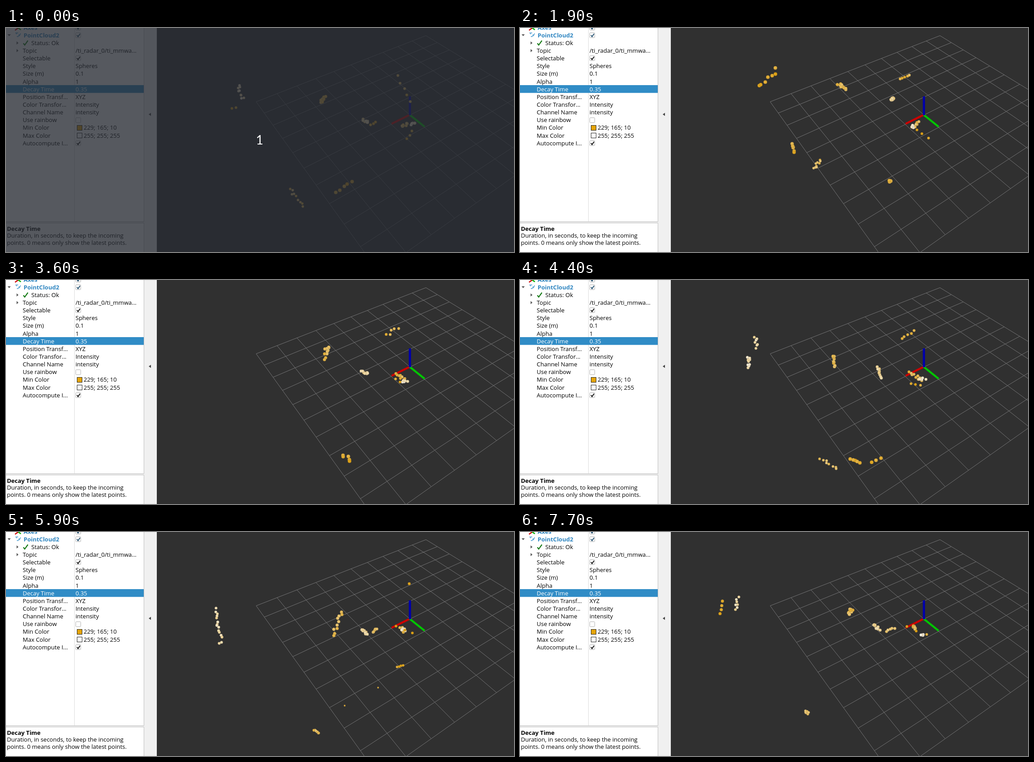
Write an HTML page with a canvas that moves like this. It is 1125 by 498 pixels and loops after 7900 ms.

```html
<!DOCTYPE html>
<html lang="en">
<head>
<meta charset="utf-8">
<title>Radar point cloud</title>
<style>
  html, body { margin: 0; width: 100%; height: 100%; overflow: hidden; background: #303030; }
  svg, canvas { position: absolute; left: 0; top: 0; width: 1125px; height: 498px; display: block; }
  text { font: 13px "Open Sans", "Noto Sans", sans-serif; fill: #000; white-space: pre; }
  .bold { font-weight: 700; }
  .blue { fill: #2f86c1; }
  .lit { fill: #fff; }
  .count { font: 28px Lato, sans-serif; fill: #fff; text-anchor: middle; }
</style>
</head>
<body>
<svg id="scene" viewBox="0 0 1125 498"></svg>
<canvas id="cloud" width="1125" height="498"></canvas>
<svg id="veil" viewBox="0 0 1125 498">
  <rect width="1125" height="498" fill="rgb(39,43,50)" fill-opacity=".78"/>
  <text class="count" x="561.5" y="259">1</text>
</svg>
<script>
const LOOP = 7900, STEP = 100, LIFE = 4; // a return stays for LIFE steps
const scene = document.getElementById('scene');
const veil = document.getElementById('veil');
const ctx = document.getElementById('cloud').getContext('2d');

// ---------- static scene ----------
function add(tag, attrs, label) {
  const el = document.createElementNS('http://www.w3.org/2000/svg', tag);
  for (const k in attrs) el.setAttribute(k, attrs[k]);
  if (label) el.textContent = label;
  scene.append(el);
}
const rect = (x, y, width, height, fill, more) => add('rect', { x, y, width, height, fill, ...more });
const path = (d, stroke, width = 1, fill = 'none') => add('path', { d, stroke, 'stroke-width': width, fill });
const text = (x, y, label, cls = '') => add('text', { x, y, class: cls }, label);
const rowY = i => 16 + 17.15 * i;

// perspective of the ground plane, one unit per cell
function ground(u, v) {
  const w = 1 + .0265 * u - .036 * v;
  return [(554 + 62.25 * u - 2.6 * v) / w, (164 - 14.25 * u + 18.3 * v) / w].map(n => n.toFixed(1));
}

function drawView() {
  rect(334, 0, 791, 498, '#303030');
  let d = '';
  for (let i = 0; i <= 10; i++) {
    d += `M${ground(i, 0)}L${ground(i, 10)}M${ground(0, i)}L${ground(10, i)}`;
  }
  path(d, '#757576');
  path('M894 193L854 213', '#cc0000', 4.4);
  path('M894 193L927 219.5', '#00c400', 4.4);
  path('M894.5 194V152', '#0000a8', 5);
}

function checkbox(y, on, color = '#111') {
  rect(154.5, y - 5.5, 11, 11, '#fff', { stroke: '#b0b0b0', rx: 1 });
  if (on) path(`M157 ${y}l2.5 3.2l4.5 -6.5`, color, 2);
}

function drawPanel() {
  rect(0, 0, 334, 498, '#f0f0f0');
  rect(0, 0, 305, 430, '#fff');
  rect(0, 434, 305, 64, '#fff');
  path('M0 430.5H305.5V0M0 433.5H305.5V498', '#bdbdbd');
  path('M151.5 0V430', '#dcdcdc');
  path('M321 188.5v7l-5 -3.5z', 'none', 0, '#444');
  rect(0, 127, 305, 17.3, '#308cc6');

  text(39, 3.6, 'Axes', 'bold blue');
  path('M27 0L20 5', '#cc0000', 2.5);
  path('M27 0L33 4', '#00b000', 2.5);
  checkbox(-1, true, '#24506f');

  path('M3.5 14h7l-3.5 4z', 'none', 0, '#555');
  for (let i = 0; i < 11; i++) {
    add('circle', { cx: 22 + i * 7 % 11, cy: 11 + i * 4 % 10, r: 1, fill: '#3f96cf' });
  }
  text(39, 20.5, 'PointCloud2', 'bold blue');
  checkbox(16, true, '#24506f');
  for (const i of [1, 2]) path(`M23.5 ${rowY(i) - 3.5}v7l4 -3.5z`, 'none', 0, '#555');
  path('M38.5 34l3 4l7 -10', '#147a14', 2.2);
  text(56, rowY(1) + 4.6, 'Status: Ok');

  const rows = [
    ['Topic', '/ti_radar_0/ti_mmwa...'], ['Selectable', true], ['Style', 'Spheres'],
    ['Size (m)', '0.1'], ['Alpha', '1'], ['Decay Time', '0.35'],
    ['Position Transf...', 'XYZ'], ['Color Transfor...', 'Intensity'],
    ['Channel Name', 'intensity'], ['Use rainbow', false],
    ['Min Color', '229; 165; 10', '#e5a50a'], ['Max Color', '255; 255; 255', '#fff'],
    ['Autocompute I...', true]
  ];
  rows.forEach(([name, value, swatch], n) => {
    const y = rowY(n + 2), cls = name === 'Decay Time' ? 'lit' : '';
    text(37, y + 4.6, name, cls);
    if (typeof value === 'boolean') return checkbox(Math.round(y), value);
    if (swatch) rect(157.5, Math.round(y) - 5.5, 11, 11, swatch, { stroke: '#222' });
    text(swatch ? 172 : 154, y + 4.6, value, cls);
  });

  text(2, 451, 'Decay Time', 'bold');
  text(2, 466, 'Duration, in seconds, to keep the incoming');
  text(2, 481.5, 'points. 0 means only show the latest points.');
}

// ---------- radar returns ----------
let seed = 11;
function rnd() {
  seed = (seed + 0x6D2B79F5) | 0;
  let t = Math.imul(seed ^ seed >>> 15, 1 | seed);
  t = t + Math.imul(t ^ t >>> 7, 61 | t) ^ t;
  return ((t ^ t >>> 14) >>> 0) / 4294967296;
}
const spread = n => (rnd() - .5) * 2 * n;
const mix = (a, b, u) => a + (b - a) * u;
const clamp = u => Math.min(1, Math.max(0, u));

// eased place of a streak; it settles shortly before each key so its trail has gathered there
function streakAt(keys, s) {
  const i = keys.findIndex(k => k[0] > s);
  if (i === 0) return keys[0];
  if (i < 0) return keys[keys.length - 1];
  const a = keys[i - 1], b = keys[i];
  const u = clamp((s - a[0]) / (b[0] - a[0] - .3));
  const e = u * u * (3 - 2 * u);
  return a.map((v, k) => mix(v, b[k], e));
}

// a reflecting object: `count` returns along a drifting streak, a quarter renewed each step
// key: seconds, centre x, y, half extent x, y
const dots = [];
function track(count, r, w, jitter, ...keys) {
  const first = Math.round(keys[0][0] * 10) - 5;
  const last = Math.round(keys[keys.length - 1][0] * 10) + 3;
  for (let step = first; step <= last; step++) {
    const [, x, y, dx, dy] = streakAt(keys, step / 10);
    for (let j = 0; j < count; j++) {
      if ((step - first) % LIFE !== j % LIFE) continue;
      const along = count > 1 ? 2 * j / (count - 1) - 1 : 0;
      dots.push({
        x: x + dx * along + spread(jitter),
        y: y + dy * along + spread(jitter),
        r, w: clamp(w + spread(.15)), born: step
      });
    }
  }
}

function buildTracks() {
  // far left
  track(9, 2.9, .75, 4, [0, 519, 143, 4, 14], [.9, 521, 129, 3, 10]);
  track(7, 4, .05, 4, [1.9, 549, 112, -20, 20], [2.8, 526, 84, -20, 22]);
  track(7, 3, .7, 3, [4.4, 523, 139, 2, 11], [5.9, 467, 187, 2, 16], [7.7, 480, 160, -2, 15]);
  track(9, 3.1, .75, 4, [4.4, 507, 182, 0, 13], [5.9, 473, 225, 3, 22]);
  track(4, 3.5, .05, 1, [7.7, 446, 168, -2, 14]);
  track(2, 3, .1, 1, [0, 505, 178, 5, 0]);
  track(4, 2.5, .1, 3, [2.8, 597, 116, 0, 13]);
  track(6, 3.8, .15, 2, [1.9, 605, 266, 1, 9], [2.8, 584, 237, 2, 11]);

  // middle of the plane
  track(10, 3.5, .3, 3, [0, 701, 161, 4, -7], [.9, 699, 160, 5, -5], [1.9, 713, 130, 8, 7],
    [2.8, 726, 137, 3, -6], [4.4, 696, 180, -1, -13], [5.9, 734, 203, 10, -26], [7.7, 731, 177, 4, -7]);
  track(9, 3.3, .6, 2.5, [0, 797, 208, 6, 3], [.9, 796, 207, 5, 5], [1.9, 825, 158, 2, -3],
    [2.8, 793, 207, 8, -6], [4.4, 795, 205, 3, 11], [5.9, 794, 223, 5, 6], [7.7, 790, 212, 6, 5]);
  track(3, 3.1, .1, 2, [0, 813, 212, 4, -3], [.9, 800, 215, 4, -4]);
  track(5, 3.2, .4, 1.5, [5.9, 817, 219, 3, -4], [7.7, 820, 217, 9, -3]);
  track(7, 3.6, .3, 4, [2.8, 793, 147, -3, 7]);
  track(6, 3.9, .4, 4, [2.8, 715, 305, -10, 10]);
  track(6, 2.7, .4, 1.5, [2.8, 857, 300, 10, -3]);
  track(4, 2.8, .1, 1, [5.9, 873, 298, 6, -2]);
  track(2, 1.9, .05, 0, [5.9, 787, 366, -37, 20]);

  // around the sensor
  track(5, 3.1, .25, 2, [0, 881, 135, 14, 28], [.9, 856, 114, 9, -8], [1.9, 853, 110, 11, -5],
    [2.8, 852, 107, 11, -5], [4.4, 859, 121, 14, -8]);
  track(1, 3.2, .05, 0, [5.9, 893, 115, 0, 0]);
  track(9, 3.2, .3, 3, [0, 884, 215, 7, -2], [.9, 877, 218, 7, 1], [1.9, 875, 216, 8, -6],
    [2.8, 872, 215, 8, 5], [4.4, 876, 214, 12, 8], [5.9, 879, 217, 4, 4], [7.7, 873, 213, 2, 3]);
  track(5, 3.2, .85, 2, [0, 902, 213, 4, -1], [.9, 900, 214, 2, 2], [1.9, 870, 219, 1, -2],
    [2.8, 875, 232, 2, 6], [4.4, 890, 219, 7, 0], [5.9, 880, 217, 3, 1], [7.7, 890, 228, 2, 1]);
  track(3, 3, .1, 2, [0, 893, 238, 7, -8], [.9, 895, 230, 1, 1], [1.9, 891, 234, 12, 9],
    [2.8, 863, 210, 4, 3], [4.4, 876, 233, 12, 1], [5.9, 882, 217, 17, 6], [7.7, 879, 220, 21, 9]);

  // near edge
  track(9, 2.8, .35, 3, [0, 644, 376, 16, 18], [.9, 651, 386, 8, 6], [1.9, 658, 303, -5, 10]);
  track(8, 2.9, .35, 3, [4.4, 684, 409, 18, 11], [5.9, 686, 444, 6, 5], [7.7, 635, 401, 2, 2]);
  track(5, 4, .1, 2, [0, 748, 354, 18, -11], [.9, 751, 360, 9, -8], [1.9, 819, 340, 0, 0],
    [2.8, 768, 389, 5, 10], [4.4, 742, 402, 12, 5]);
  track(3, 4, .1, 1, [4.4, 789, 401, 10, -5]);
  track(5, 4.5, .15, 2, [2.8, 610, 475, -10, 15]);
}

function shade(w, k) {
  const [r, g, b] = [[226, 255], [165, 250], [24, 240]].map(([lo, hi]) => Math.round(mix(lo, hi, w) * k));
  return `rgb(${r},${g},${b})`;
}
function disc(x, y, r, fill) {
  ctx.fillStyle = fill;
  ctx.beginPath();
  ctx.arc(x, y, r, 0, Math.PI * 2);
  ctx.fill();
}

const held = [54, 56, 60, 66, 78];
let shown = -1;
function draw(ms) {
  let step = Math.floor(ms % LOOP / STEP);
  if (held.includes(step)) step--;
  if (step === shown) return;
  shown = step;
  veil.style.visibility = step === 0 ? 'visible' : 'hidden';
  ctx.clearRect(0, 0, 1125, 498);
  for (const p of dots) {
    if (step < p.born || step >= p.born + LIFE) continue;
    disc(p.x, p.y, p.r, shade(p.w, .86));
    disc(p.x - .2, p.y - .2, p.r - .8, shade(p.w, .98));
  }
}

drawView();
drawPanel();
buildTracks();
const start = performance.now();
function tick() {
  draw(performance.now() - start);
  requestAnimationFrame(tick);
}
tick();
</script>
</body>
</html>
```
